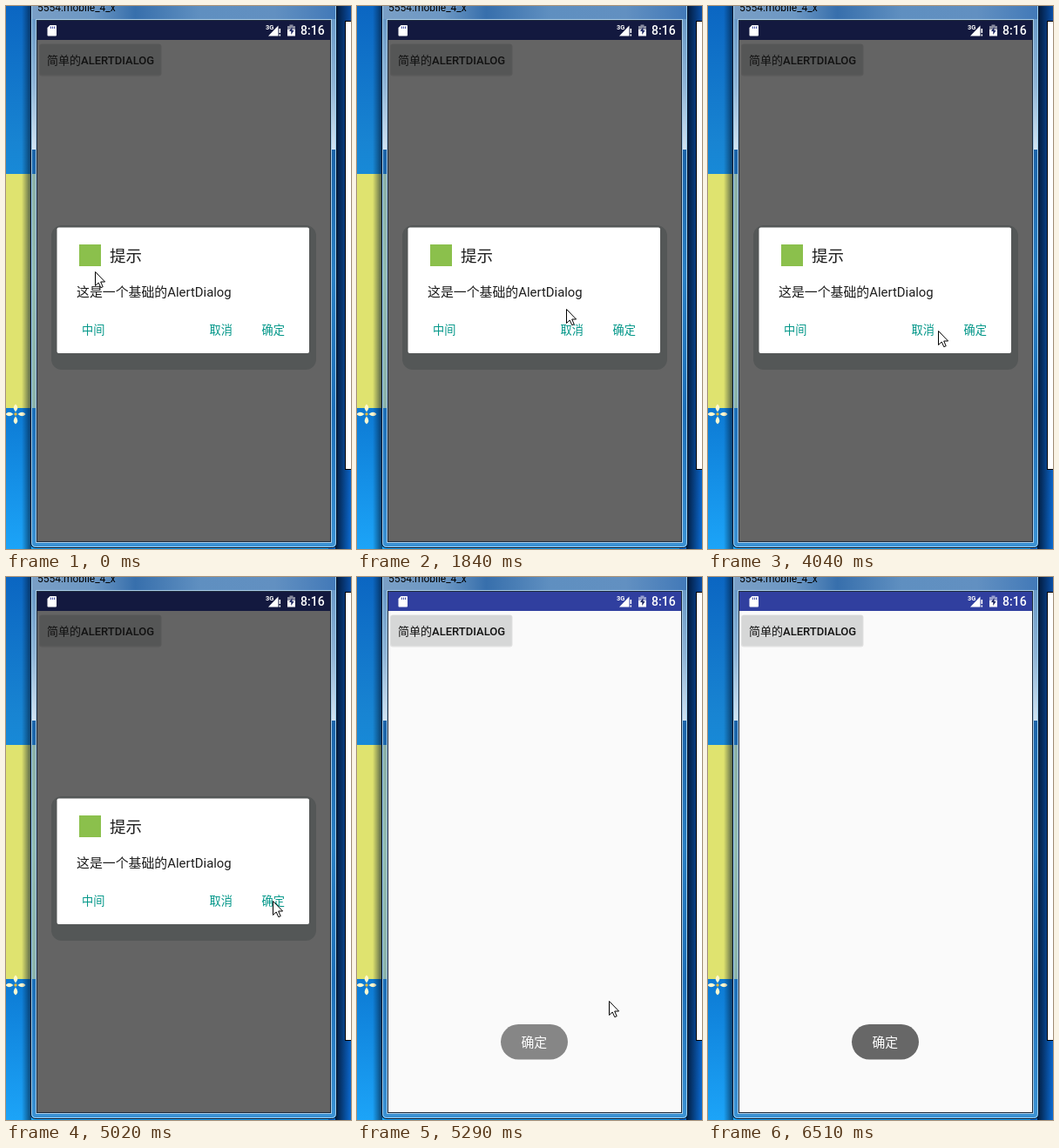
An HTML page that plays this animation: 396x624 px, repeating every 6610 ms.

```html
<!DOCTYPE html>
<html lang="zh-CN">
<head>
<meta charset="utf-8">
<title>AlertDialog</title>
<style>
  html, body { margin: 0; width: 100%; height: 100%; overflow: hidden; background: #0f62b8; }
  svg { display: block; width: 396px; height: 624px; }
  text { font-family: Roboto, "Noto Sans CJK SC", "Noto Sans CJK", sans-serif; }
  .teal { fill: #009688; font-size: 13.2px; }
</style>
</head>
<body>
<svg viewBox="0 0 396 624" xmlns="http://www.w3.org/2000/svg">
  <defs>
    <linearGradient id="sky" x2="0" y2="1">
      <stop offset="0" stop-color="#0b66c2"/>
      <stop offset=".25" stop-color="#1884d2"/>
      <stop offset=".5" stop-color="#179be8"/>
      <stop offset=".73" stop-color="#0c78d2"/>
      <stop offset="1" stop-color="#1ca4f8"/>
    </linearGradient>
    <linearGradient id="skyRight" x2="0" y2="1">
      <stop offset="0" stop-color="#0a4fa6"/>
      <stop offset=".8" stop-color="#0c62c4"/>
      <stop offset="1" stop-color="#0b6cd4"/>
    </linearGradient>
    <linearGradient id="shadeLeft">
      <stop offset="0" stop-color="#00142e" stop-opacity="0"/>
      <stop offset="1" stop-color="#00142e" stop-opacity=".65"/>
    </linearGradient>
    <linearGradient id="shadeRight">
      <stop offset="0" stop-color="#000c20" stop-opacity=".85"/>
      <stop offset="1" stop-color="#000c20" stop-opacity="0"/>
    </linearGradient>
    <linearGradient id="caption">
      <stop offset="0" stop-color="#7a9fc6"/>
      <stop offset=".2" stop-color="#6c97c3"/>
      <stop offset=".34" stop-color="#376fac"/>
      <stop offset=".55" stop-color="#5f8fc0"/>
      <stop offset=".8" stop-color="#6290c1"/>
      <stop offset="1" stop-color="#4279b8"/>
    </linearGradient>
    <linearGradient id="glass" x2="0" y2="1">
      <stop offset="0" stop-color="#5f92c2"/>
      <stop offset=".15" stop-color="#8fb4d6"/>
      <stop offset=".27" stop-color="#d2e3f1"/>
      <stop offset=".27" stop-color="#1c63a8"/>
      <stop offset=".5" stop-color="#2a80c4"/>
      <stop offset=".75" stop-color="#1d6fb8"/>
      <stop offset="1" stop-color="#3b92d4"/>
    </linearGradient>
  </defs>

  <!-- desktop -->
  <rect width="396" height="624" fill="url(#sky)"/>
  <rect x="370" width="26" height="624" fill="url(#skyRight)"/>
  <rect x="-234" y="193" width="269" height="269" fill="#dfe36f"/>
  <g transform="translate(11 469)" fill="#fff8cf">
    <g id="petals"></g>
    <circle r="1.7" fill="#e6b93c"/>
  </g>
  <rect x="18" width="11" height="624" fill="url(#shadeLeft)"/>
  <rect x="378" width="18" height="624" fill="url(#shadeRight)"/>
  <rect x="389.5" y="17.5" width="12" height="515" fill="#fff" stroke="#000"/>

  <!-- window frame -->
  <path d="M28.5-4V617q0 5.500 5.500 5.500H374q5.500 0 5.500-5.500V-4z" fill="url(#glass)" stroke="#04152c"/>
  <rect x="30" y="193" width="5" height="269" fill="#e6eba0" opacity=".55"/>
  <path d="M29.500-4V616q0 5.500 5 5.500H373.500q5 0 5-5.500V-4" fill="none" stroke="#9fd0f2"/>
  <rect x="30" width="348" height="15" fill="url(#caption)"/>
  <text x="36" y="6" font-size="12">5554:mobile_4_x</text>
  <rect x="34.500" y="15.500" width="339" height="601" fill="none" stroke="#a8cbe6"/>

  <!-- phone screen -->
  <rect x="35" y="16" width="338" height="600" fill="#1d2a3c"/>
  <rect x="36" y="17" width="336" height="22" fill="#303f9f"/>
  <rect x="36" y="39" width="336" height="576" fill="#fafafa"/>
  <rect x="38" y="43.500" width="140.500" height="37" rx="3" opacity=".1"/>
  <rect x="39" y="44" width="138.500" height="35" rx="2" fill="#d6d7d7"/>
  <rect id="dim" x="36" y="17" width="336" height="598"/>
  <text x="47" y="66.500" font-size="13" fill="#111">简单的<tspan font-weight="500">ALERTDIALOG</tspan></text>

  <!-- status bar -->
  <g fill="#fff">
    <path d="M50.500 22H57q1 0 1 1V33.500q0 1-1 1H48.500q-1 0-1-1V25z"/>
    <path d="M51.500 23.500v2.500M53.500 23.500v2.500M55.500 23.500v2.500" stroke="#303f9f" stroke-width=".9"/>
    <text x="298" y="26.500" font-size="7.500" font-weight="700">3G</text>
    <path d="M312.500 22.500V34.500H301z"/>
    <path d="M313.500 26h1.600v5h-1.600zM313.500 32.600h1.600v1.800h-1.600z"/>
    <path d="M323 23h2.500v-1.500h4V23h2.500v5h-9z" opacity=".5"/>
    <path d="M323 27h9v7.500h-9z"/>
    <path d="M328.500 24l-3.500 5h2.300v4l3.300-5h-2.100z" fill="#1b2560"/>
    <text x="338" y="33" font-size="14" font-weight="500">8:16</text>
  </g>

  <!-- dialog -->
  <g id="dialog">
    <rect x="52" y="252" width="304" height="166" rx="12" fill="#545757"/>
    <rect x="58.500" y="254.500" width="289.500" height="144.500" rx="2" fill="#fff"/>
    <rect x="84" y="274" width="25" height="25" fill="#8bc04c"/>
    <text x="119" y="294" font-size="18.500" fill="#1d1d1d">提示</text>
    <text x="81" y="334" font-size="14.900" fill="#1d1d1d">这是一个基础的AlertDialog</text>
    <text class="teal" x="87" y="377">中间</text>
    <text class="teal" x="233.500" y="377">取消</text>
    <text class="teal" x="293.500" y="377">确定</text>
  </g>

  <!-- toast -->
  <g id="toast">
    <rect x="165" y="514" width="77" height="40.500" rx="20.250" fill-opacity=".588"/>
    <text x="188.500" y="540" font-size="14.800" fill="#fff">确定</text>
  </g>

  <path id="cursor" d="M.5.5V16.500L4.200 13l2.600 5.700 2.400-1L6.700 12h4.900z" fill="#fff" stroke="#000"/>
</svg>
<script>
const $ = id => document.getElementById(id);
const LOOP = 6610;
const STEP = 137.5;
const CLICK = 37;     // last step with the dialog open

// pointer turns: step, x, y
const turns = [
  [0, 102, 305], [3, 160, 263], [5, 93, 281], [7, 85, 327], [9, 93, 337], [11, 139, 340],
  [13, 227, 341], [17, 279, 367], [19, 271, 373], [23, 155, 381], [25, 113, 377], [27, 117, 375],
  [28, 213, 374], [31, 290, 373], [33, 306, 372], [CLICK, 306, 372], [38, 305, 383],
  [39, 289, 487], [43, 330, 650]
];

const clamp = v => Math.min(1, Math.max(0, v));
const smooth = v => v * v * (3 - 2 * v);

function pointer(n) {
  const i = turns.findIndex(k => k[0] > n);
  if (i < 0) return turns.at(-1).slice(1);
  const [a, b] = [turns[i - 1], turns[i]];
  const p = (n - a[0]) / (b[0] - a[0]);
  return [1, 2].map(j => Math.round(a[j] + (b[j] - a[j]) * p));
}

$("petals").innerHTML = [0, 90, 180, 270].map(a =>
  `<path d="M0-2.500Q-4.500-8 0-11.500Q4.500-8 0-2.500" transform="rotate(${a})"/>`).join("");

function draw(t) {
  const n = Math.floor((t - 600) / STEP) + 5;
  $("cursor").setAttribute("transform", `translate(${pointer(n)})`);
  $("dialog").setAttribute("visibility", n > CLICK ? "hidden" : "visible");
  $("dim").setAttribute("opacity", .6 * (1 - clamp((n - CLICK) / 2)) ** 1.45);
  $("toast").setAttribute("opacity", n > CLICK ? smooth(clamp(.4 + .3 * (n - CLICK - 1))) : 0);
}

const start = performance.now();
function tick() {
  draw((performance.now() - start) % LOOP);
  requestAnimationFrame(tick);
}
tick();
</script>
</body>
</html>
```
